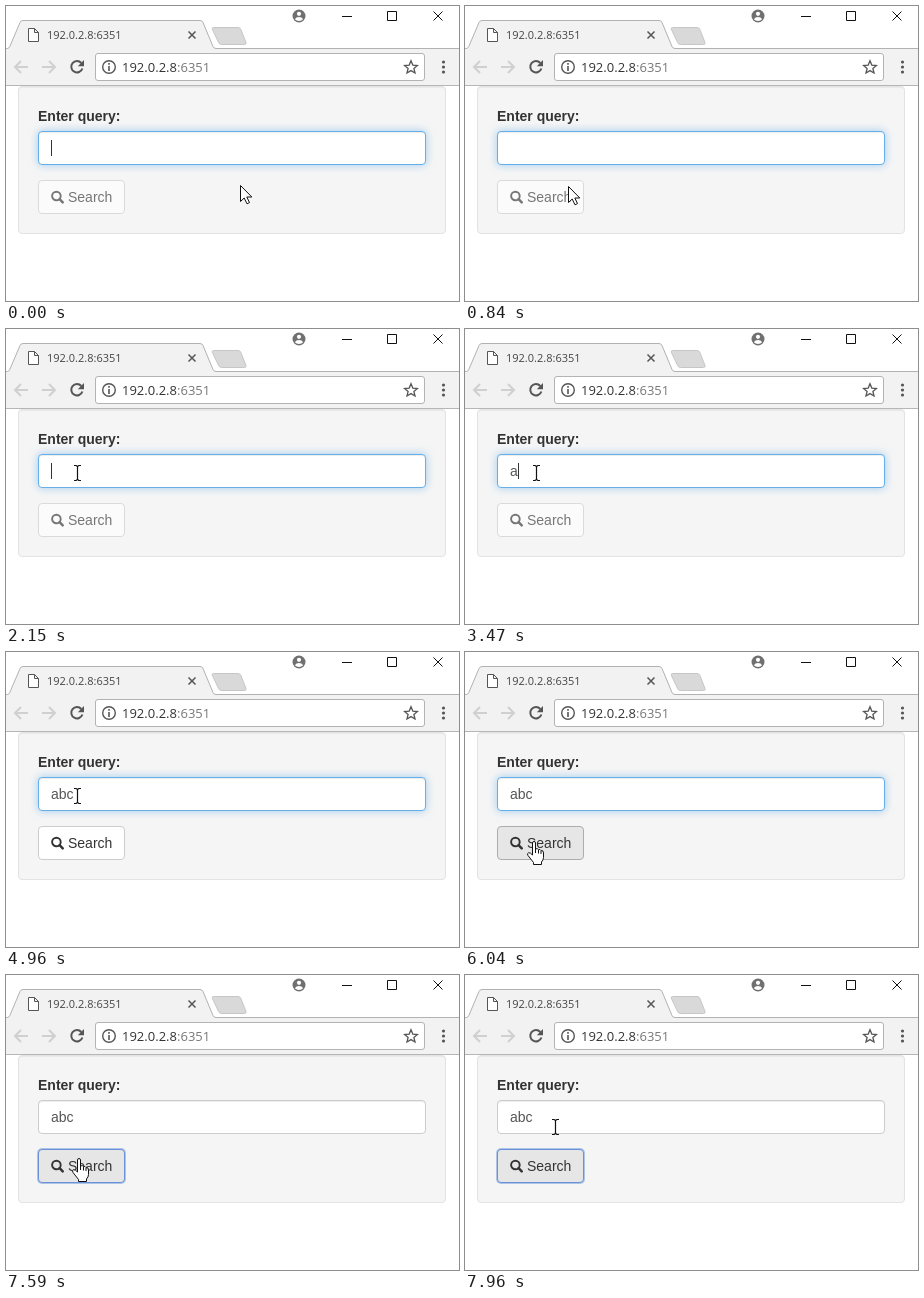
An HTML page for the animation above (8 s loop, 453 by 295 pixels).

```html
<!DOCTYPE html>
<html lang="en">
<head>
<meta charset="utf-8">
<title>Query form</title>
<style>
html, body { margin: 0; width: 100%; height: 100%; overflow: hidden; background: #fff; }
#stage { position: relative; width: 453px; height: 295px; overflow: hidden; font: 14px/20px "Liberation Sans", Arial, sans-serif; color: #333; }
#stage > * { position: absolute; box-sizing: border-box; }
svg { left: 0; top: 0; }
.ui { font-family: "Open Sans", "Noto Sans", sans-serif; }
#well { left: 12px; top: 80px; width: 428px; height: 148px; background: #f5f5f5; border: 1px solid #e3e3e3; border-radius: 4px; box-shadow: inset 0 1px 1px rgba(0,0,0,.05); }
#label { left: 32px; top: 100px; font-weight: bold; }
#input { left: 32px; top: 125px; width: 388px; height: 34px; padding: 6px 12px; background: #fff; border: 1px solid #ccc; border-radius: 4px; color: #555; }
#caret { left: 45px; top: 134px; width: 1px; height: 16px; background: #333; }
#button { left: 32px; top: 174px; width: 87px; height: 34px; padding: 6px 0 0 29px; border: 1px solid #ccc; border-radius: 4px; }
#button svg { position: absolute; left: 12px; top: 9px; }
</style>
</head>
<body>
<div id="stage">
  <svg width="453" height="80" viewBox="0 0 453 80" fill="none">
    <!-- window buttons -->
    <circle cx="293" cy="10" r="6.5" fill="#707070"/>
    <circle cx="293" cy="7.8" r="2.1" fill="#fff"/>
    <path d="M288.9 13.2Q290 11 293 11T297.1 13.2Q295.6 15 293 15T288.9 13.2Z" fill="#fff"/>
    <path d="M336 10.5H346M381.5 5.5H390.5V14.5H381.5ZM427.5 5.5L436.5 14.5M436.5 5.5L427.5 14.5" stroke="#111"/>
    <!-- toolbar and tab -->
    <path d="M0 42H453V80H0Z" fill="#f2f2f2"/>
    <path d="M0 42.5H1.5Q3 42.3 3.8 40.5L14 16.5Q14.8 14.5 17 14.5H194Q196.2 14.5 197 16.5L207 40.5Q207.8 42.5 210 42.5H453V43H0Z" fill="#f2f2f2"/>
    <path d="M0 42.5H1.5Q3 42.3 3.8 40.5L14 16.5Q14.8 14.5 17 14.5H194Q196.2 14.5 197 16.5L207 40.5Q207.8 42.5 210 42.5H453" stroke="#b2b2b2"/>
    <path d="M207.5 21.5H232Q234 21.5 234.8 23.3L240 36.5Q240.6 38.5 238.5 38.5H215.5Q213.5 38.5 212.7 36.7L206.3 23.3Q205.7 21.5 207.5 21.5Z" fill="#d9d9d9" stroke="#c6c6c6"/>
    <path d="M22.5 22.5H28.5L32.5 26.5V35.5H22.5ZM28.5 22.5V26.5H32.5" fill="#fff" stroke="#555"/>
    <text class="ui" x="41" y="33" font-size="11" fill="#444">192.0.2.8:6351</text>
    <path d="M182.5 25.5L189.5 32.5M189.5 25.5L182.5 32.5" stroke="#555" stroke-width="1.5"/>
    <path d="M0 79.5H453" stroke="#b6b6b6"/>
    <!-- navigation -->
    <path d="M22 61H9.5M15 55L9 61L15 67M36 61H48.5M43 55L49 61L43 67" stroke="#d0d0d0" stroke-width="2"/>
    <path d="M75.3 57A5.7 5.7 0 1 0 76.4 62.5" stroke="#555" stroke-width="2"/>
    <path d="M78 54V60.2H71.8Z" fill="#555"/>
    <rect x="89.5" y="47.5" width="329" height="27" rx="2.5" fill="#fff" stroke="#b3b3b3"/>
    <circle cx="103" cy="61" r="6.3" stroke="#555" stroke-width="1.4"/>
    <path d="M103 57V58.7M103 60V65" stroke="#555" stroke-width="1.6"/>
    <text class="ui" x="116" y="66" font-size="13" fill="#333">192.0.2.8<tspan fill="#777">:6351</tspan></text>
    <path d="M405 54.8L406.8 59.1L411.4 59.5L407.9 62.5L409 67L405 64.6L401 67L402.1 62.5L398.6 59.5L403.2 59.1Z" stroke="#555" stroke-width="1.3"/>
    <g fill="#555"><circle cx="437.5" cy="56" r="1.6"/><circle cx="437.5" cy="61" r="1.6"/><circle cx="437.5" cy="66" r="1.6"/></g>
  </svg>
  <div id="well"></div>
  <div id="label">Enter query:</div>
  <div id="input"></div>
  <div id="caret"></div>
  <div id="button">
    <svg width="13" height="14" fill="none" stroke="#333"><circle cx="5.4" cy="6" r="4.3" stroke-width="1.9"/><path d="M8.6 9.2L11.7 12.3" stroke-width="2.5" stroke-linecap="round"/></svg>Search
  </div>
  <svg width="453" height="295" viewBox="0 0 453 295">
    <g id="pointer" stroke-linejoin="round">
      <path id="arrow" d="M.5 .5V16.5L4.2 13L7 18.8L9.5 17.6L6.8 12H11.8Z" fill="#fff" stroke="#111"/>
      <path id="beam" d="M-3-7.5H-1L.5-6.5L2-7.5H4M.5-7V7M-3 7.5H-1L.5 6.5L2 7.5H4" fill="none" stroke="#111" stroke-width="1.2"/>
      <g id="hand" transform="translate(-6 0)" stroke="#111">
        <path d="M5.5 14V2Q5.5 .5 7 .5T8.5 2V8Q10.5 6.8 11.5 8.7Q13.2 7.8 14 9.6Q16.5 9 16.5 12V16.5Q16.5 19 14.5 21V23.5H6.5V21.5L1 14.5Q-.3 12.3 1.5 11.8T5.5 14Z" fill="#fff"/>
        <path d="M8.5 8V12M11.5 9V12.5M14 10V13" fill="none"/>
      </g>
    </g>
  </svg>
</div>
<script>
const LOOP = 8000;
const CARET_ON = [[0, 530], [1070, 1600], [2150, 2610], [3140, 4960], [5490, 6040]];
const CARET_X = [45, 53, 60, 68];
const KEYS = [3470, 3930, 4390];
const PRESS = 6570, RELEASE = 6810;
const $ = id => document.getElementById(id);
const smooth = p => p * p * (3 - 2 * p);
const same = p => p;

// start, step length, step count, easing, then start / control / end points
const MOVES = [
  [450, 77.5, 8, smooth, [234, 179], [150, 181], [81, 180]],
  [1450, 77.8, 9, same, [81, 180], [83.5, 162], [71, 144]],
  [5810, 76.7, 4, same, [71, 144], [70, 166], [68, 189]],
  [7590, 74, 6, same, [68, 189], [79, 170.5], [90, 152]]
];

function pointerAt(t) {
  let pos = MOVES[0][4];
  for (const [start, step, count, ease, a, c, b] of MOVES) {
    if (t < start) break;
    const i = Math.floor((t - start + 8) / step) + 1;
    const p = ease(Math.min(1, i / count)), q = 1 - p;
    pos = a.map((v, k) => Math.round(q * q * v + 2 * p * q * c[k] + p * p * b[k]));
  }
  return pos;
}

const inside = ([x, y], l, t, r, b) => x >= l && x < r && y >= t && y < b;
const show = (id, on) => { $(id).style.display = on ? "" : "none"; };
const mix = (a, b, p) => `rgb(${a.map((v, k) => Math.round(v + (b[k] - v) * p))})`;

function draw(t) {
  const typed = KEYS.filter(k => t >= k).length;
  const enabled = typed > 1;
  const pos = pointerAt(t);
  const overInput = inside(pos, 32, 125, 420, 159);
  const overButton = enabled && inside(pos, 32, 174, 119, 208);

  $("pointer").setAttribute("transform", `translate(${pos})`);
  show("beam", overInput);
  show("hand", overButton);
  show("arrow", !overInput && !overButton);

  $("input").textContent = "abc".slice(0, typed);
  $("caret").style.left = CARET_X[typed] + "px";
  show("caret", CARET_ON.some(([a, b]) => t >= a && t < b));

  const blur = t < PRESS ? 0 : Math.min(1, (Math.floor((t - PRESS) / 80) + .5) / 2);
  const input = $("input").style;
  input.borderColor = mix([102, 175, 233], [204, 204, 204], blur);
  input.boxShadow = `inset 0 1px 1px rgba(0,0,0,.075), 0 0 8px rgba(102,175,233,${.6 * (1 - blur)})`;

  const focused = t >= PRESS, pressed = focused && t < RELEASE;
  const button = $("button").style;
  button.opacity = enabled ? 1 : .65;
  button.background = pressed ? "#d4d4d4" : focused || overButton ? "#e6e6e6" : "#fff";
  button.borderColor = focused ? "#6a92d8" : overButton ? "#adadad" : "#ccc";
  button.boxShadow = (focused ? "0 0 0 1px rgba(106,146,216,.5)" : "0 0 0 0 transparent") +
    (pressed ? ", inset 0 3px 5px rgba(0,0,0,.125)" : "");
}

let origin = null;
function tick(now) {
  if (origin === null) origin = now;
  draw((now - origin) % LOOP);
  requestAnimationFrame(tick);
}
draw(0);
requestAnimationFrame(tick);
</script>
</body>
</html>
```
